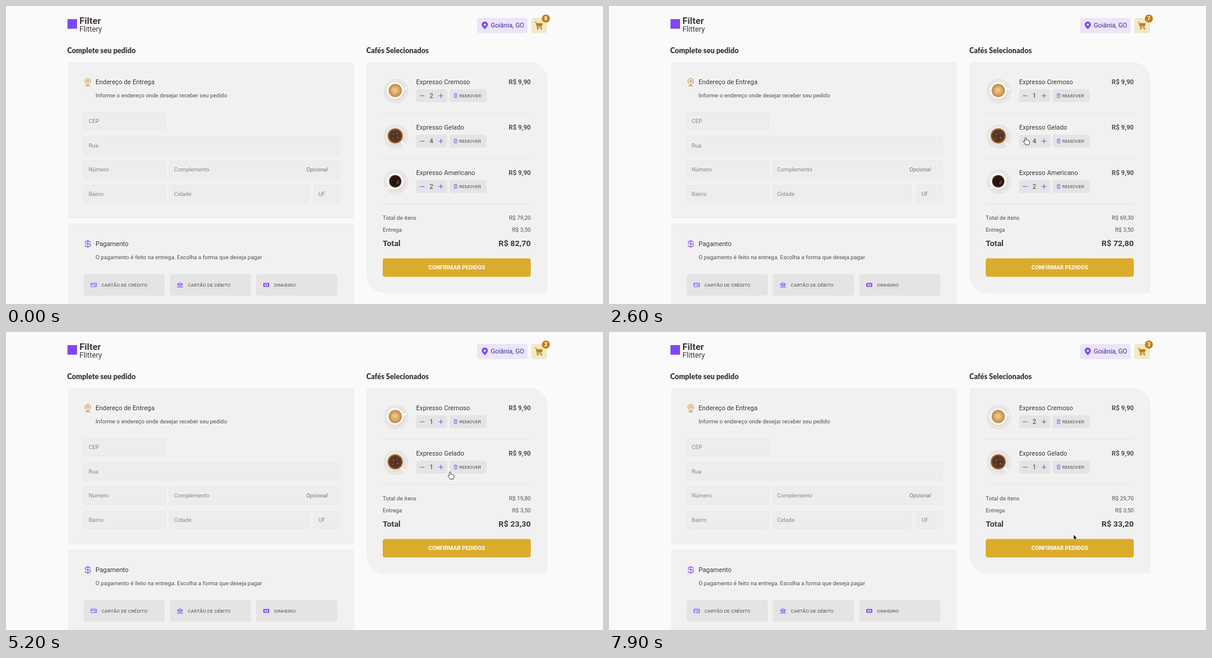
Write an HTML page that moves like this. It is 1000 by 499 pixels and loops after 8 s.

```html
<!DOCTYPE html>
<html lang="pt-BR">
<head>
<meta charset="utf-8">
<title>Pedido</title>
<style>
  html, body { margin: 0; width: 100%; height: 100%; overflow: hidden; background: #fafafa; }
  svg { display: block; width: 100%; height: 100%; }
  text { font-family: Roboto, Arial, sans-serif; white-space: pre; }
</style>
</head>
<body>
<svg id="stage" viewBox="0 0 1000 499" xmlns="http://www.w3.org/2000/svg"></svg>
<script>
const LOOP = 8000, STEP = 100, ROW = 76;
const PRICE = 9.9, SHIPPING = 3.5;
const C = {
  card: '#f1f1f1', input: '#ededed', line: '#e6e5e5', button: '#e5e4e4',
  title: '#403937', text: '#574f4d', label: '#8d8686',
  purple: '#8047f8', darkPurple: '#4b2995', yellow: '#dbac2c', darkYellow: '#c47f17'
};
const S = 8.08, M = 9.43, L = 10.78, XL = 13.48;

const text = (x, y, str, size, fill, extra = '') =>
  `<text x="${x}" y="${y}" font-size="${size}" fill="${fill}" ${extra}>${str}</text>`;
const box = (x, y, w, h, fill, r = 4, extra = '') =>
  `<rect x="${x}" y="${y}" width="${w}" height="${h}" rx="${r}" fill="${fill}" ${extra}/>`;
const stroke = (d, color, width = 1) =>
  `<path d="${d}" fill="none" stroke="${color}" stroke-width="${width}" stroke-linecap="round" stroke-linejoin="round"/>`;
const circle = (x, y, r, fill, extra = '') =>
  `<circle cx="${x}" cy="${y}" r="${r}" fill="${fill}" ${extra}/>`;
const group = (x, y, body, id = '') =>
  `<g ${id && `id="${id}"`} transform="translate(${x} ${y})">${body}</g>`;
const BOLD = 'font-weight="700"', END = 'text-anchor="end"', MID = 'text-anchor="middle"';

const heading = (x, str) =>
  text(x, 79, str, 12.1, C.title, 'font-weight="900" style="font-family:Lato,sans-serif"');
const input = (x, y, w, label) =>
  box(x + .5, y + .5, w - 1, 29, C.input, 3, `stroke="${C.line}" stroke-width=".8"`) +
  text(x + 8.5, y + 18, label, M, C.label);
const payment = (x, label, icon) =>
  box(x, 449, 136, 36, C.button) + group(x + 17, 467, icon) +
  text(x + 30, 469.8, label, S, C.text);

const header = () =>
  box(103, 22, 16, 16, C.purple, 0) +
  text(123, 30, 'Filter', 15.5, C.title, BOLD) +
  text(123, 42.5, 'Flittery', 12.4, C.title) +
  box(789, 20, 84.5, 25.5, '#ebe5f9') +
  `<path d="M802 39C798.5 35.4 796.8 33.4 796.8 31.2a5.2 5.2 0 0 1 10.4 0C807.2 33.4 805.500 35.4 802 39Z" fill="${C.purple}"/>` +
  circle(802, 31.3, 1.9, '#ebe5f9') +
  text(812, 36.3, 'Goiânia, GO', L, C.darkPurple) +
  box(880, 20, 26, 25.5, '#f1e9c9') +
  `<path d="M888.300 28.800H899L897.500 34.500H889.500Z" fill="${C.darkYellow}"/>` +
  stroke('M886 27H887.800L890 36.300H897.500', C.darkYellow, 1.2) +
  circle(890.6, 38.2, 1.2, C.darkYellow) + circle(896.8, 38.2, 1.2, C.darkYellow) +
  circle(904.3, 21, 6.8, C.darkYellow) +
  text(904.3, 24.3, '', M, '#fff', `id="badge" ${BOLD} ${MID}`);

const form = () =>
  heading(102.5, 'Complete seu pedido') +
  box(104, 94, 479, 262, C.card) +
  stroke('M137 132.500C133.700 129.600 132.300 128 132.300 126a4.700 4.700 0 0 1 9.400 0C141.700 128 140.300 129.600 137 132.500ZM133.500 133.700H140.500', C.darkYellow) +
  circle(137, 126, 1.7, 'none', `stroke="${C.darkYellow}"`) +
  text(150, 131, 'Endereço de Entrega', L, C.title) +
  text(150, 153.3, 'Informe o endereço onde desejar receber seu pedido', M, C.text) +
  input(130, 178, 138, 'CEP') +
  input(130, 218.5, 429, 'Rua') +
  input(130, 259, 138, 'Número') +
  input(273, 259, 286, 'Complemento') +
  text(539, 277, 'Opcional', M, '#777170', `font-style="italic" ${END}`) +
  input(130, 299.5, 138, 'Bairro') +
  input(273, 299.5, 234, 'Cidade') +
  input(515, 299.5, 44, 'UF') +
  box(104, 364, 479, 150, C.card) +
  stroke('M137 392V404.500M141 395.800C141 394.300 139.600 393.500 138.300 393.500H135.700C131.800 393.500 131.800 398 135.700 398H138.500C142.400 398 142.400 403 138.500 403H135.300C133.800 403 132.500 402 132.500 400.500', C.purple, 1.1) +
  text(150, 401.7, 'Pagamento', L, C.title) +
  text(150, 424.4, 'O pagamento é feito na entrega. Escolha a forma que deseja pagar', M, C.text) +
  payment(130, 'CARTÃO DE CRÉDITO',
    stroke('M-4.500-3H4.500V3H-4.500ZM-4.500-.8H4.500M1 1.500H2.800', C.purple, .9)) +
  payment(274.5, 'CARTÃO DE DÉBITO',
    stroke('M-4.500-1.200L0-4L4.500-1.200ZM-3-1V2.500M-1-1V2.500M1-1V2.500M3-1V2.500M-4.800 3.800H4.800', C.purple, .9)) +
  payment(419, 'DINHEIRO',
    box(-5, -3.2, 10, 6.4, C.purple, .6) + `<path d="M-3.500 0L-1.700-2H1.700L3.500 0L1.700 2H-1.700Z" fill="${C.card}"/>` +
    circle(0, 0, 1.4, C.purple));

const gradient = (id, ...stops) =>
  `<radialGradient id="${id}">${stops.map(([at, color]) => `<stop offset="${at}" stop-color="${color}"/>`).join('')}</radialGradient>`;
const defs = () => '<defs>' +
  gradient('saucer', [0, '#d5d2cf'], [.65, '#dcdad8'], [.85, '#eceae8'], [1, '#e3e1df']) +
  gradient('cream', [0, '#e8c081'], [.6, '#d9a964'], [1, '#b98543']) +
  gradient('iced', [0, '#4d3325'], [.75, '#58382a'], [.84, '#8d5628'], [1, '#c18a50']) +
  gradient('black', [0, '#21110d'], [.8, '#2d1712'], [1, '#5a3c31']) + '</defs>';

const cup = (fill, r, handle) =>
  circle(0, 0, 20.5, 'url(#saucer)') +
  stroke(handle, '#fafafa', 3) +
  circle(-1, -1, 14.2, '#f8f7f6') + circle(-1, -1, r, `url(#${fill})`);
const CUPS = [
  cup('cream', 11, 'M10-3L17-5') +
    `<ellipse cx="-2" cy="-2" rx="5" ry="4" fill="#edcb94" opacity=".6"/>`,
  cup('iced', 13, 'M9 9L14 13') + circle(-4, -4, 1.2, '#94705a') + circle(2, -5, 1, '#94705a') +
    circle(3, 2, 1.2, '#94705a') + circle(-5, 3, 1, '#94705a'),
  cup('black', 10.5, 'M-10 8L-14 11') +
    `<ellipse cx="3" cy="1" rx="2" ry="4" fill="#7a625a" opacity=".5" transform="rotate(25 3 1)"/>`
];

const item = (name, i) => group(0, i * ROW,
  group(653, 142.5, CUPS[i]) +
  text(687, 131, name, L, C.title) +
  text(879, 131, 'R$ 9,90', L, C.text, `${BOLD} ${END}`) +
  box(687, 139.5, 52, 21.5, C.button) +
  stroke('M693.500 150.300H700.500M725 150.300H732M728.500 146.800V153.800', C.purple) +
  text(712.5, 154.2, '', L, C.title, `id="count${i}" ${MID}`) +
  box(743, 139.5, 62, 21.5, C.button) +
  stroke('M750.500 148H755.500M751 148V153.500H755V148M752 146.500H754M753 150V151.800', C.purple, .8) +
  text(759, 153.2, 'REMOVER', S, C.text) +
  stroke('M631 179.700H879', C.line), `item${i}`);

const summary = () => group(0, 0,
  text(631, 357.6, 'Total de itens', M, C.text) +
  text(879, 357.6, '', M, C.text, `id="subtotal" ${END}`) +
  text(631, 377.8, 'Entrega', M, C.text) +
  text(879, 377.8, 'R$ 3,50', M, C.text, END) +
  text(631, 402.2, 'Total', XL, C.title, BOLD) +
  text(879, 402.2, '', XL, C.title, `id="total" ${BOLD} ${END}`) +
  box(631, 422.5, 248, 31, C.yellow) +
  text(755, 441.3, 'CONFIRMAR PEDIDOS', M, '#fff', `${BOLD} ${MID}`), 'summary');

const cursor = () => group(0, 0,
  `<path id="arrow" d="M0 0V9L2.100 7.200L3.600 10.400L5.100 9.700L3.700 6.600H6.500Z" fill="#111" stroke="#fff" stroke-width=".7"/>` +
  `<path id="hand" d="M-1.300 1.200C-1.300-.2 .9-.2 .9 1.200V4.700C1.500 3.900 2.700 4.100 2.900 4.900C3.700 4.300 4.700 4.600 4.800 5.400C5.700 5 6.500 5.500 6.500 6.500V8.500C6.500 10 5.700 10.600 5.500 12.300H-.3C-.7 10.400-2.400 9.300-3.500 7.200C-4 6-2.600 5.400-1.300 7Z" fill="#fff" stroke="#333" stroke-width=".9" stroke-linejoin="round"/>`,
  'cursor');

document.getElementById('stage').innerHTML = defs() + header() + form() +
  heading(603.5, 'Cafés Selecionados') +
  `<path id="cart" fill="${C.card}"/>` +
  ['Expresso Cremoso', 'Expresso Gelado', 'Expresso Americano'].map(item).join('') +
  summary() + cursor();

const $ = id => document.getElementById(id);
const setText = (id, value) => { $(id).textContent = value; };
const show = (id, visible) => $(id).setAttribute('visibility', visible ? 'visible' : 'hidden');
const move = (id, x, y) => $(id).setAttribute('transform', `translate(${x} ${y})`);
const money = value => 'R$ ' + value.toFixed(2).replace('.', ',');

// [time, item, new quantity]
const CLICKS = [[1800, 0, 1], [2700, 1, 3], [2900, 1, 2], [3400, 1, 1], [4300, 2, 0], [6000, 0, 2]];
// [time, x, y] of the pointer tip
const PATH = [
  [400, 538, 490], [600, 582, 400], [800, 635, 285], [1000, 680, 205], [1200, 698, 169],
  [1400, 698, 157], [1500, 698, 152], [1600, 698, 153], [1900, 698, 153],
  [2100, 692, 172], [2300, 690, 196], [2500, 697, 217], [2600, 698, 220], [3400, 698, 220],
  [3600, 720, 242], [3900, 770, 288], [4100, 786, 300], [4400, 786, 300],
  [4700, 776, 280], [5000, 757, 251], [5200, 744, 234], [5300, 732, 223],
  [5400, 738, 199], [5600, 732, 161], [5700, 729, 150], [5800, 729, 152.500], [6100, 729, 152.500],
  [6200, 758, 132], [6300, 826, 94], [6400, 887, 60], [6500, 914, 32], [6600, 925, 14],
  [6700, 923, 9], [7000, 904, 14],
  [7200, 893, 62], [7400, 857, 162], [7600, 812, 270], [7800, 783, 328], [7900, 778, 339]
];

function pointerAt(t) {
  const i = PATH.findIndex(p => p[0] >= t);
  if (i <= 0) return PATH[i < 0 ? PATH.length - 1 : 0].slice(1);
  const [t0, x0, y0] = PATH[i - 1], [t1, x1, y1] = PATH[i];
  const k = (t - t0) / (t1 - t0);
  return [x0 + (x1 - x0) * k, y0 + (y1 - y0) * k];
}

const inside = (x, y, left, top, w, h) => x >= left && x <= left + w && y >= top && y <= top + h;
const isClickable = (x, y, rows) =>
  inside(x, y, 880, 14, 27, 31) ||
  Array.from({ length: rows }, (_, i) => 139 + i * ROW).some(top =>
    inside(x, y, 692, top + 4, 10, 14) || inside(x, y, 724, top + 4, 10, 14) ||
    inside(x, y, 743, top, 62, 22));

function render(time) {
  const t = Math.floor(time % LOOP / STEP) * STEP;
  const counts = [2, 4, 2];
  for (const [at, i, count] of CLICKS) if (t >= at) counts[i] = count;
  const units = counts.reduce((a, b) => a + b);
  const rows = counts.filter(Boolean).length;
  const shift = (rows - 3) * ROW, bottom = 480.5 + shift;

  counts.forEach((count, i) => {
    setText('count' + i, count);
    show('item' + i, count > 0);
  });
  setText('badge', units);
  setText('subtotal', money(units * PRICE));
  setText('total', money(units * PRICE + SHIPPING));
  move('summary', 0, shift);
  $('cart').setAttribute('d',
    `M608 94H877A30 30 0 0 1 907 124V${bottom - 4}A4 4 0 0 1 903 ${bottom}H634A30 30 0 0 1 604 ${bottom - 30}V98A4 4 0 0 1 608 94Z`);

  const [x, y] = pointerAt(t), visible = t >= PATH[0][0], hand = isClickable(x, y, rows);
  move('cursor', x, y);
  show('arrow', visible && !hand);
  show('hand', visible && hand);
}

const start = performance.now();
function tick() {
  render(performance.now() - start);
  requestAnimationFrame(tick);
}
tick();
</script>
</body>
</html>
```
